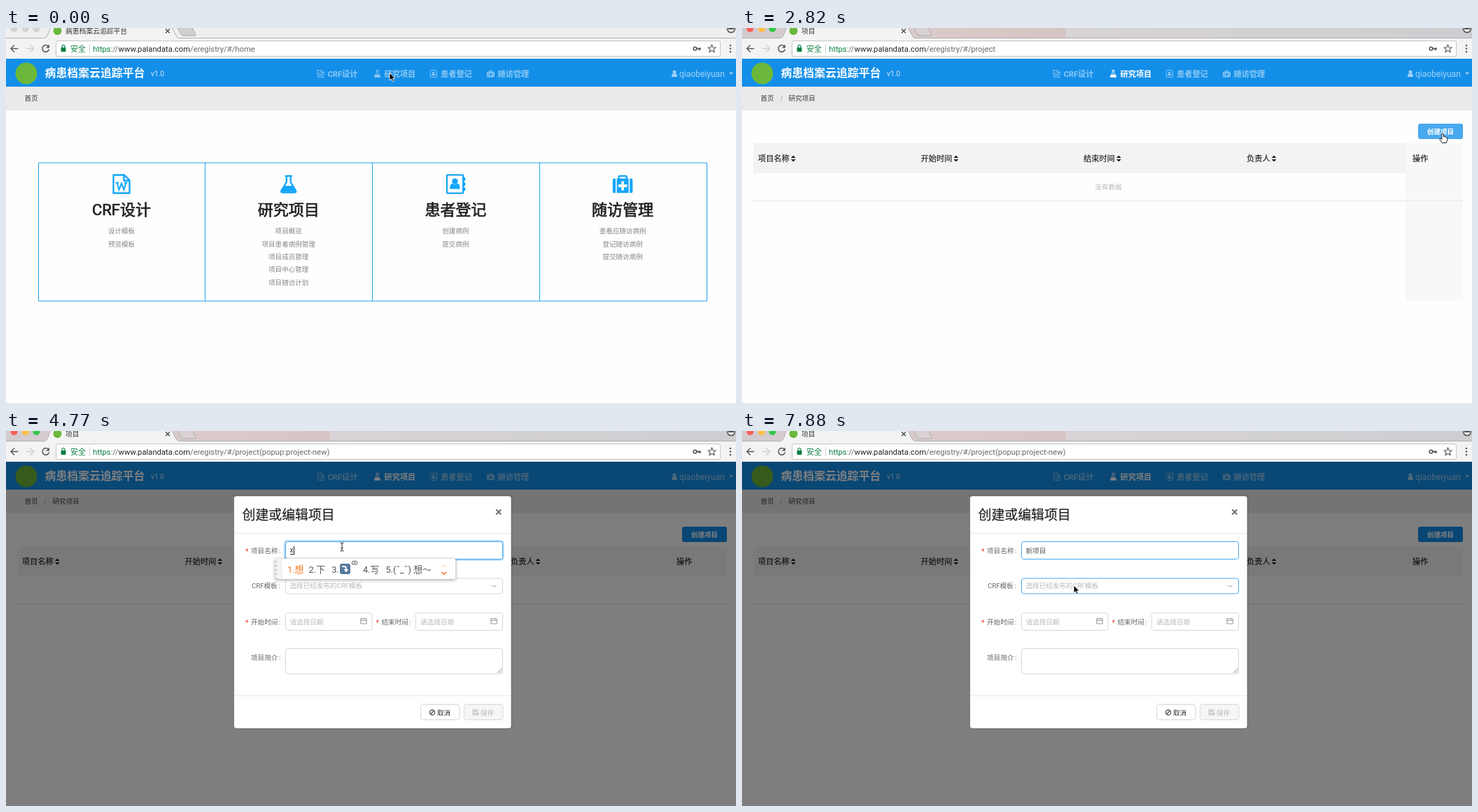
These frames come from a looping animation (1043x537 px, 8 s). An HTML page:

```html
<!DOCTYPE html>
<html lang="zh-CN">
<head>
<meta charset="utf-8">
<title>病患档案云追踪平台</title>
<style>
html, body { margin: 0; width: 100%; height: 100%; overflow: hidden; background: #fff; }
#stage { display: block; width: 100vw; height: 100vh; }
#stage, .field, .ime { font-family: Roboto, "Noto Sans CJK SC", "Noto Sans CJK", sans-serif; }
text { white-space: pre; }
.off { display: none !important; }
.mid { text-anchor: middle; }
.small { font-size: 9.6px; }
.brand { font-size: 15.9px; font-weight: 700; fill: #fff; }
.nav { font-size: 11.2px; font-weight: 700; fill: currentColor; }
.link { color: #fff; opacity: .52; }
.link.on { opacity: 1; }
.head { font-size: 22px; fill: #222; stroke: #222; stroke-width: .7px; }
.item { font-size: 9.55px; fill: #868686; }
.col { font-size: 11.2px; fill: #222; stroke: #222; stroke-width: .2px; }
.hint { font-size: 9.6px; fill: #b8b8b8; }
.label { font-size: 9.6px; fill: #666; }
.box { fill: #fff; stroke: #d6d6d6; }
.box.blue { stroke: #49a9ee; }
.line { fill: none; stroke: currentColor; }
.field { height: 26px; display: flex; align-items: center; padding-left: 6.5px; font-size: 9.6px; color: #555; }
.typing { font-size: 10.3px; line-height: 11px; color: #333; border-bottom: 1px solid #333; }
.caret { width: 1px; height: 12px; background: #222; }
.ime { position: absolute; left: 5px; top: 3px; height: 29px; box-sizing: border-box; padding: 0 34px 0 17px;
  display: flex; align-items: center; gap: 9.2px; background: #fff; color: #555; font-size: 12.8px;
  white-space: pre; box-shadow: 0 1px 5px rgba(0,0,0,.4); }
.ime b { font-weight: 400; }
.ime b:first-of-type { color: #f5791f; margin-right: -2px; }
.ime .grip { position: absolute; left: 0; top: 0; width: 8px; height: 29px; border-right: 1px solid #e6e6e6;
  background: radial-gradient(circle, #ccc 1.1px, transparent 1.5px) -1px 1px / 5px 6px repeat-y #f4f4f4; }
.ime svg { position: absolute; right: 11px; top: 7px; }
.key { display: inline-block; position: relative; width: 15px; height: 15px; margin: 0 9px 0 1px; border-radius: 3px;
  background: #56799a; vertical-align: -2px; }
.ime .key svg { left: 0; top: 0; }
</style>
</head>
<body>
<svg id="stage" viewBox="0 0 1043 537" preserveAspectRatio="none">
<defs>
  <linearGradient id="strip">
    <stop offset="0" stop-color="#d2cbce"/><stop offset=".26" stop-color="#dacbca"/>
    <stop offset=".443" stop-color="#d5c4c3"/><stop offset=".444" stop-color="#d7d3d6"/>
    <stop offset="1" stop-color="#cfcdd1"/>
  </linearGradient>
  <symbol id="doc" viewBox="0 0 26 29">
    <path class="line" stroke-width="2.4" stroke-linejoin="round" d="M1.5 1.5H17L24.5 9V27.5H1.5ZM16.5 1.5V9.5H24.5"/>
    <path class="line" stroke-width="2" d="M4.5 12.5H9M17 12.5H21.5M6.7 12.5L9.5 22.5L13 13.5L16.5 22.5L19.3 12.5"/>
  </symbol>
  <symbol id="flask" viewBox="0 0 26 28">
    <path class="line" stroke-width="2.4" stroke-linejoin="round" d="M7.5 2H18.5M10 2V11L2.2 24Q1.2 26.5 4 26.5H22Q24.8 26.5 23.8 24L16 11V2"/>
    <path fill="currentColor" d="M7.2 16.5H18.8L24 25.5H2Z"/>
  </symbol>
  <symbol id="book" viewBox="0 0 28 29">
    <rect class="line" stroke-width="2.4" x="1.4" y="1.4" width="23.4" height="26.2" rx="1.5"/>
    <path class="line" stroke-width="2.4" d="M26.8 5V10M26.8 12V17M26.8 19V24"/>
    <circle cx="13" cy="10.5" r="4.2" fill="currentColor"/>
    <path fill="currentColor" d="M5.8 21.5Q5.8 14 9.6 13.6Q13 16.6 16.4 13.6Q20.2 14 20.2 21.5Z"/>
  </symbol>
  <symbol id="kit" viewBox="0 0 29 26">
    <path class="line" stroke-width="2.4" d="M9 6V3Q9 1.3 10.7 1.3H18.3Q20 1.3 20 3V6"/>
    <path fill="currentColor" fill-rule="evenodd" d="M4.4 5V26H3Q0 26 0 23V8Q0 5 3 5ZM24.6 5V26H26Q29 26 29 23V8Q29 5 26 5ZM6 5H23V26H6ZM12.7 9V13.6H8.2V17.4H12.7V22H16.3V17.4H20.8V13.6H16.3V9Z"/>
  </symbol>
  <symbol id="sort" viewBox="0 0 7 9"><path fill="#222" d="M0 3.6L3.5 0L7 3.6ZM0 5.4H7L3.5 9Z"/></symbol>
  <symbol id="cal" viewBox="0 0 10 10">
    <path class="line" d="M.8 2H9.2V9H.8ZM.8 4.4H9.2M3 .5V2.5M7 .5V2.5"/>
  </symbol>
  <symbol id="disk" viewBox="0 0 9 9">
    <path class="line" d="M.7 .7H6.8L8.3 2.2V8.3H.7ZM2.5 .7V3H6V.7M2.3 8.3V5.5H6.7V8.3"/>
  </symbol>
</defs>
<rect width="1043" height="537" fill="#fefefe"/>

<!-- browser window -->
<g id="frame">
  <rect id="tabs" width="1043" height="14.5"/>
  <g id="lights"><circle cx="11.5" cy="1" r="5"/><circle cx="28" cy="1" r="5"/><circle cx="43.5" cy="1" r="5"/></g>
  <rect y="14" width="1043" height="30" fill="#f4f3f4"/>
  <path d="M0 14.5H55Q58 14 60 9L64 -1H237L242 9Q244 14 247 14.5H1043" fill="#f4f3f4" stroke="#b3b0b2"/>
  <path id="newtab" d="M245 -1H266L271 9Q272 11 269.5 11H254Q251 11 250 9Z" stroke="#aaa6a8"/>
  <circle cx="73.5" cy="4" r="6" fill="#6cb83a"/>
  <text id="tabname" x="85" y="7.6" font-size="9.8" fill="#333"></text>
  <path d="M228 1.2L234 7.2M234 1.2L228 7.2" stroke="#444" stroke-width="1.3"/>
  <circle cx="1036" cy="1" r="5.5" fill="#eee" stroke="#555" stroke-width="1.6"/>
  <path d="M1032 1H1040" stroke="#555" stroke-width="2"/>
  <path d="M17.5 29.5H7.5M12 24.5L7 29.5L12 34.5" fill="none" stroke="#5a5a5a" stroke-width="1.5"/>
  <path d="M29 29.5H39M34.5 24.5L39.5 29.5L34.5 34.5" fill="none" stroke="#d0d0d0" stroke-width="1.5"/>
  <path d="M60.5 26.3A4.8 4.8 0 1 0 61.5 30.5" fill="none" stroke="#5a5a5a" stroke-width="1.5"/>
  <path d="M62 23.5V28.5H57Z" fill="#5a5a5a"/>
  <rect x="71.5" y="18.5" width="949" height="22" rx="2.5" fill="#fff" stroke="#c6c4c6"/>
  <rect x="78.5" y="28" width="7" height="6" rx=".8" fill="#0b8043"/>
  <path d="M80 28.5V26.5A2 2 0 0 1 84 26.5V28.5" fill="none" stroke="#0b8043" stroke-width="1.2"/>
  <text x="92" y="33.6" font-size="11" fill="#0b8043">安全</text>
  <path d="M119.5 23V36" stroke="#ccc"/>
  <text x="124" y="33.5" font-size="11.26" fill="#6a6a6a"><tspan fill="#0b8043">https</tspan>://<tspan fill="#222">www.palandata.com</tspan>/eregistry/#/<tspan id="route"></tspan></text>
  <path d="M986.5 29.5H993M991 29.5V32" stroke="#555" stroke-width="1.8"/>
  <circle cx="984.5" cy="29.5" r="2.3" fill="none" stroke="#555" stroke-width="1.6"/>
  <path d="M1008.5 24L1010 27.7L1014 28L1011 30.6L1012 34.5L1008.5 32.4L1005 34.5L1006 30.6L1003 28L1007 27.7Z" fill="none" stroke="#555" stroke-width="1.1"/>
  <g fill="#5a5a5a"><circle cx="1035" cy="25" r="1.3"/><circle cx="1035" cy="29.5" r="1.3"/><circle cx="1035" cy="34" r="1.3"/></g>
</g>

<!-- site header -->
<rect y="44" width="1043" height="40" fill="#138fe9"/>
<circle cx="29" cy="65" r="15.5" fill="#6cb83a"/>
<text class="brand" x="55.5" y="70.4">病患档案云追踪平台</text>
<text x="207" y="69" font-size="10.2" fill="#d5eafb">v1.0</text>
<g id="nav"></g>
<g fill="#fff" opacity=".6">
  <circle cx="955" cy="63" r="2.5"/><path d="M951 70Q951 65.5 953.5 65Q955 66.2 956.5 65Q959 65.5 959 70Z"/>
  <text x="962" y="69.5" font-size="12.05">qiaobeiyuan</text>
  <path d="M1033 63.5H1039.5L1036.2 66.8Z"/>
</g>
<rect y="84" width="1043" height="34" fill="#eaeaea"/>
<g class="small" fill="#373a3c">
  <text x="26.5" y="104.3">首页</text>
  <g id="crumb"><text x="54.5" y="104.3" fill="#999">/</text><text x="66.5" y="104.3">研究项目</text></g>
</g>

<g id="home">
  <path d="M46.5 193H1001.5V391H46.5ZM284.5 193V391M523.5 193V391M762.5 193V391" fill="none" stroke="#1ea4ea"/>
</g>

<g id="project">
  <rect id="create" x="966" y="137" width="64" height="22" rx="3"/>
  <text class="mid small" x="998" y="151.7" fill="#fff" font-weight="700">创建项目</text>
  <path d="M16 208V168Q16 165 19 165H1030V208Z" fill="#f3f3f3"/>
  <rect id="fixed" x="948" y="165" width="82" height="226" fill="#f8f8f8"/>
  <path d="M16 247.5H1030" stroke="#e6e6e6"/>
  <text class="mid hint" x="523.5" y="231">没有数据</text>
  <text class="col" x="958" y="191.2">操作</text>
</g>

<g id="status">
  <path d="M-1 527.5H346Q348.5 527.5 348.5 530V538H-1Z" fill="#f4f4f4" stroke="#bbb"/>
  <text x="1" y="536.6" font-size="9.15" fill="#333">https://www.palandata.com/eregistry/#/project</text>
</g>

<g id="modal">
  <rect y="44" width="1043" height="493" fill="#000" opacity=".5"/>
  <rect x="325.5" y="93" width="396.5" height="333" rx="3.5" fill="#fff" stroke="#000" stroke-opacity=".35"/>
  <text x="337.5" y="126.6" font-size="18.9" fill="#222" stroke="#222" stroke-width=".2">创建或编辑项目</text>
  <path d="M700.3 112.5L707.3 119.5M707.3 112.5L700.3 119.5" stroke="#757575" stroke-width="2.4"/>
  <path d="M326 146.5H721.5M326 379H721.5" stroke="#e5e5e5"/>
  <rect id="glow" x="398" y="157.2" width="312.5" height="27.6" rx="4" fill="none" stroke="#108ee9" stroke-opacity=".35" stroke-width="2"/>
  <rect id="name" class="box" x="399.5" y="158.5" width="310" height="25" rx="3"/>
  <rect id="select" class="box" x="399.5" y="211" width="310" height="22" rx="3"/>
  <rect class="box" x="399.5" y="260.5" width="123.5" height="25" rx="3"/>
  <rect class="box" x="585.5" y="260.5" width="124" height="25" rx="3"/>
  <rect class="box" x="399.5" y="311.5" width="310" height="36.5" rx="3"/>
  <path d="M702 346.5L708.5 340M705.5 346.5L708.5 343.5" stroke="#777" stroke-width=".9"/>
  <text class="hint" x="405.5" y="225.4">选择已经发布的CRF模板</text>
  <path d="M694.5 220.5L697.5 223.5L700.5 220.5" fill="none" stroke="#999"/>
  <text class="hint" x="405.5" y="276.5">请选择日期</text>
  <text class="hint" x="592" y="276.5">请选择日期</text>
  <g color="#999"><use href="#cal" x="506" y="267" width="10" height="10"/><use href="#cal" x="692" y="267" width="10" height="10"/></g>
  <g id="labels"></g>
  <rect class="box" x="592.5" y="391.5" width="55.5" height="22" rx="3"/>
  <circle cx="609" cy="403" r="3.6" fill="none" stroke="#444" stroke-width="1.2"/>
  <path d="M606.5 405.5L611.5 400.5" stroke="#444" stroke-width="1.2"/>
  <text class="small" x="616" y="406.6" fill="#333">取消</text>
  <g id="save">
    <rect x="654.5" y="391.5" width="55.5" height="22" rx="3"/>
    <use href="#disk" x="666.5" y="398.5" width="9" height="9"/>
    <text class="small" x="678" y="406.6" fill="currentColor">保存</text>
  </g>
  <foreignObject x="399" y="158" width="310" height="26">
    <div class="field"><span id="typed"></span><i id="caret" class="caret"></i></div>
  </foreignObject>
  <foreignObject x="380" y="180" width="330" height="42"><div id="ime" class="ime off"></div></foreignObject>
</g>

<g id="cursor">
  <path id="arrow" d="M0 0V11L2.6 8.8L4.3 12.8L6.2 12L4.5 8.1H8Z" fill="#000" stroke="#fff" stroke-width=".9"/>
  <path id="hand" d="M-1.2 .6Q0 -.6 1.2 .6V4.6Q2.6 3.8 3.3 5Q4.7 4.4 5.2 5.6Q6.6 5.3 6.7 7V9.5L5.3 13.5H-.8L-4 8.8Q-4.4 7 -2.8 7.2L-1.2 8.6Z" fill="#fff" stroke="#222" stroke-width="1"/>
  <path id="beam" d="M-2.5 -6Q0 -6 0 -4.5Q0 -6 2.5 -6M0 -4.5V4.5M-2.5 6Q0 6 0 4.5Q0 6 2.5 6M-1.5 1.5H1.5" fill="none" stroke="#222"/>
</g>
</svg>

<script>
const $ = id => document.getElementById(id);
const show = (id, on) => $(id).classList.toggle('off', !on);
const LOOP = 8000;
const APP = '病患档案云追踪平台';

const cards = [
  { name: 'CRF设计', icon: 'doc', w: 26, h: 29, nav: 444, items: ['设计模板', '预览模板'] },
  { name: '研究项目', icon: 'flask', w: 25, h: 27, nav: 525, items: ['项目概览', '项目患者病例管理', '项目成员管理', '项目中心管理', '项目随访计划'] },
  { name: '患者登记', icon: 'book', w: 28, h: 29, nav: 605.5, items: ['创建病例', '提交病例'] },
  { name: '随访管理', icon: 'kit', w: 29, h: 26, nav: 687, items: ['查看应随访病例', '登记随访病例', '提交随访病例'] }
];
const icon = (id, x, y, w, h) => `<use href="#${id}" x="${x}" y="${y}" width="${w}" height="${h}"/>`;
const text = (cls, x, y, s) => `<text class="${cls}" x="${x}" y="${y}">${s}</text>`;

$('nav').innerHTML = cards.map((c, i) =>
  `<g class="link" id="link${i}">${icon(c.icon, c.nav, 60, 11, 11)}${text('nav', c.nav + 15.5, 69.6, c.name)}</g>`).join('');
$('home').innerHTML += cards.map((c, i) => {
  const x = 165 + i * 238.7;
  return `<g color="#14a6fb">${icon(c.icon, x - c.w / 2, 223.5 - c.h / 2, c.w, c.h)}</g>` +
    text('mid head', x, 267.8, c.name) +
    c.items.map((s, k) => text('mid item', x, 294.3 + k * 18.3, s)).join('');
}).join('');
$('project').innerHTML += [['项目名称', 23], ['开始时间', 255.5], ['结束时间', 488], ['负责人', 721]]
  .map(([s, x]) => text('col', x, 191.2, s) + icon('sort', x + s.length * 11.2 + 2, 182.5, 7, 9)).join('');
$('labels').innerHTML = [['项目名称', 350, 174.5, 1], ['CRF模板', 351, 225.4], ['开始时间', 350, 276.5, 1], ['结束时间', 536.5, 276.5, 1], ['项目简介', 350, 327.5]]
  .map(([s, x, y, must]) => text('label', x, y, s + '<tspan dx="1.5">:</tspan>') +
    (must ? `<text x="${x - 8}" y="${y + 1.5}" font-size="10.5" fill="#f04134">*</text>` : '')).join('');

const emoji = '<span class="key"><svg width="15" height="15"><path d="M3 4H6Q9 4 9 7V10M6.5 8L9 11L11.5 8" fill="none" stroke="#fff" stroke-width="1.8"/></svg>' +
  '<svg width="9" height="6" style="left:17px;top:-4px"><rect x=".5" y=".5" width="7" height="4.5" rx="1" fill="#fff" stroke="#555"/><path d="M2.5 2.8H5.5" stroke="#555"/></svg></span>';
const keys = [
  [4770, 'x', ['想', '下', emoji, '写', '(ˇ_ˇ) 想～']],
  [4920, 'xi', '系 西 喜 洗 细'],
  [5220, 'xin', '新 心 信 辛 新的'],
  [5520, "xin'x", '新型 信息 心想 新线 新鲜'],
  [5666, "xin'xi", '信息 欣喜 新西 心细 心系'],
  [5812, "xin'xia", '新下 心下 欣夏 新夏 心夏'],
  [5958, "xin'xian", '新鲜 新县 新线 心弦 芯线'],
  [6104, "xin'xiang", '新乡 心想 新项 馨香 心香'],
  [6250, "xin'xiang'm", '新项目 新乡 心想 新 心'],
  [6550, "xin'xiang'mu", '新项目 新项 心想 新 心']
];
const COMMIT = 6700;
const moves = [
  [150, 450, 3, 566, 68], [1200, 1350, 2, 562, 67], [1950, 2820, 7, 1001, 151],
  [2970, 2970, 1, 1000, 149], [3120, 3720, 5, 480, 166], [7150, 7880, 6, 474, 221]
];

// progress in n equal hard steps, the first at a and the last at b
function stepped(t, a, b, n) {
  if (t < a) return 0;
  const gap = (b - a) / (n - 1) || 1;
  const p = Math.min(1, (Math.floor((t - a) / gap + 1e-6) + 1) / n);
  return p * p * (3 - 2 * p);
}
function cursorAt(t) {
  let x = 548, y = 64;
  for (const [a, b, n, tx, ty] of moves) {
    const p = stepped(t, a, b, n);
    x += (tx - x) * p;
    y += (ty - y) * p;
  }
  return [x, y];
}

let shown = null;
function setIme(key) {
  if (key === shown) return;
  shown = key;
  show('ime', key);
  if (!key) return;
  const list = typeof key[2] === 'string' ? key[2].split(' ') : key[2];
  $('ime').innerHTML = '<i class="grip"></i>' + list.map((s, i) => `<b>${i + 1}.${s}</b>`).join('') +
    '<svg width="10" height="20"><path d="M1.5 5L5 2L8.5 5" fill="none" stroke="#f9c9a4"/><path d="M1.5 12L5 15L8.5 12" fill="none" stroke="#f0641e" stroke-width="1.4"/></svg>';
}

function draw(t) {
  const awake = t >= 150, project = t >= 1800, modal = t >= 2970;
  const [x, y] = cursorAt(t);

  $('tabs').setAttribute('fill', awake ? 'url(#strip)' : '#efefef');
  $('newtab').setAttribute('fill', awake ? '#d8d2d5' : '#d0d0d0');
  const tones = awake ? ['#fb605b', '#fdbd3f', '#33c748'] : Array(3).fill('#d2d2d2');
  [...$('lights').children].forEach((c, i) => c.setAttribute('fill', tones[i]));
  $('tabname').textContent = project ? '项目' : APP;
  $('route').textContent = modal ? 'project(popup:project-new)' : project ? 'project' : 'home';

  $('link1').classList.toggle('on', t >= 300);
  show('status', t >= 300 && t < 1950);
  show('home', !project);
  show('project', project);
  show('crumb', project);
  show('fixed', !modal);
  show('modal', modal);
  $('create').setAttribute('fill', t >= 2820 && !modal ? '#49a9ee' : modal && t < 3120 ? '#0e77ca' : '#108ee9');

  const ready = t < 3120;
  const save = $('save'), rect = save.firstElementChild;
  save.setAttribute('color', ready ? '#fff' : '#b5b5b5');
  save.setAttribute('font-weight', ready ? 700 : 400);
  rect.setAttribute('fill', ready ? '#108ee9' : '#f5f5f5');
  rect.setAttribute('stroke', ready ? '#108ee9' : '#d9d9d9');

  const inField = modal && x > 399 && x < 710 && y > 158 && y < 184;
  $('name').classList.toggle('blue', inField || t >= 3870);
  show('glow', t >= 3870 && t < 7880);
  $('select').classList.toggle('blue', modal && x > 399 && x < 710 && y > 211 && y < 233);

  const key = t < COMMIT ? keys.filter(k => t >= k[0]).pop() || null : null;
  $('typed').textContent = t >= COMMIT ? '新项目' : key ? key[1] : '';
  $('typed').className = key ? 'typing' : '';
  show('caret', t >= 4020 && t < 7150);
  setIme(key);

  const hand = (t >= 300 && t < 1950) || (t >= 2820 && !modal);
  show('hand', hand);
  show('beam', inField);
  show('arrow', !hand && !inField);
  $('cursor').setAttribute('transform', `translate(${x} ${y})`);
}

const start = performance.now();
function tick() {
  draw((performance.now() - start) % LOOP);
  requestAnimationFrame(tick);
}
tick();
</script>
</body>
</html>
```
